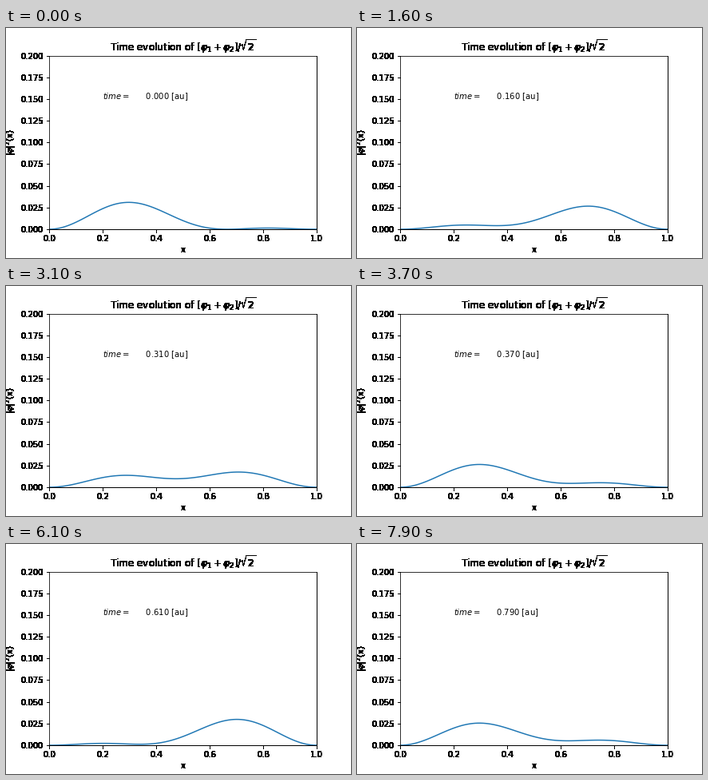
A matplotlib script for the animation above (8000 ms loop, 432 by 288 pixels).

```python
import numpy as np
import matplotlib.pyplot as plt
from matplotlib.animation import FuncAnimation

FRAMES, INTERVAL, DT = 80, 100, 0.01
N = 100                      # grid intervals, sets the norm of the states
OMEGA = 3 * np.pi**2 / 2     # E2 - E1 for a unit box, atomic units

x = np.linspace(0, 1, N + 1)
phi1 = np.sqrt(2 / N) * np.sin(np.pi * x)
phi2 = np.sqrt(2 / N) * np.sin(2 * np.pi * x)


def density(t):
    return (phi1**2 + phi2**2) / 2 + phi1 * phi2 * np.cos(OMEGA * t)


def harden(img, dpi):
    """Turn every touched pixel solid black."""
    out = np.zeros_like(img)
    out[..., 3] = img[..., 3] > 0
    return out, 0, 0


fig, ax = plt.subplots(figsize=(6, 4), dpi=72)
fig.subplots_adjust(left=0.125, right=0.9, bottom=0.125, top=0.88)

ax.set_xlim(0, 1)
ax.set_ylim(0, 0.2)
ax.set_yticks(np.linspace(0, 0.2, 9))
ax.set_xlabel("x")
ax.set_ylabel(r"$|\varphi|^2$(x)")
ax.set_title(r"Time evolution of $[\varphi_1+\varphi_2]/\sqrt{2}$")

# Everything outside the plot area is drawn without soft edges
for artist in (ax.xaxis, ax.yaxis, ax.title,
               ax.spines["right"], ax.spines["bottom"]):
    artist.set_agg_filter(harden)

line, = ax.plot(x, density(0))
clock = ax.text(0.2, 0.15, "")


def update(i):
    t = i * DT
    line.set_ydata(density(t))
    clock.set_text(r"$time = $ %10.3f [au]" % t)
    return line, clock


update(0)
anim = FuncAnimation(fig, update, frames=FRAMES, interval=INTERVAL,
                     repeat=True, repeat_delay=0, blit=False)
plt.show()
```
